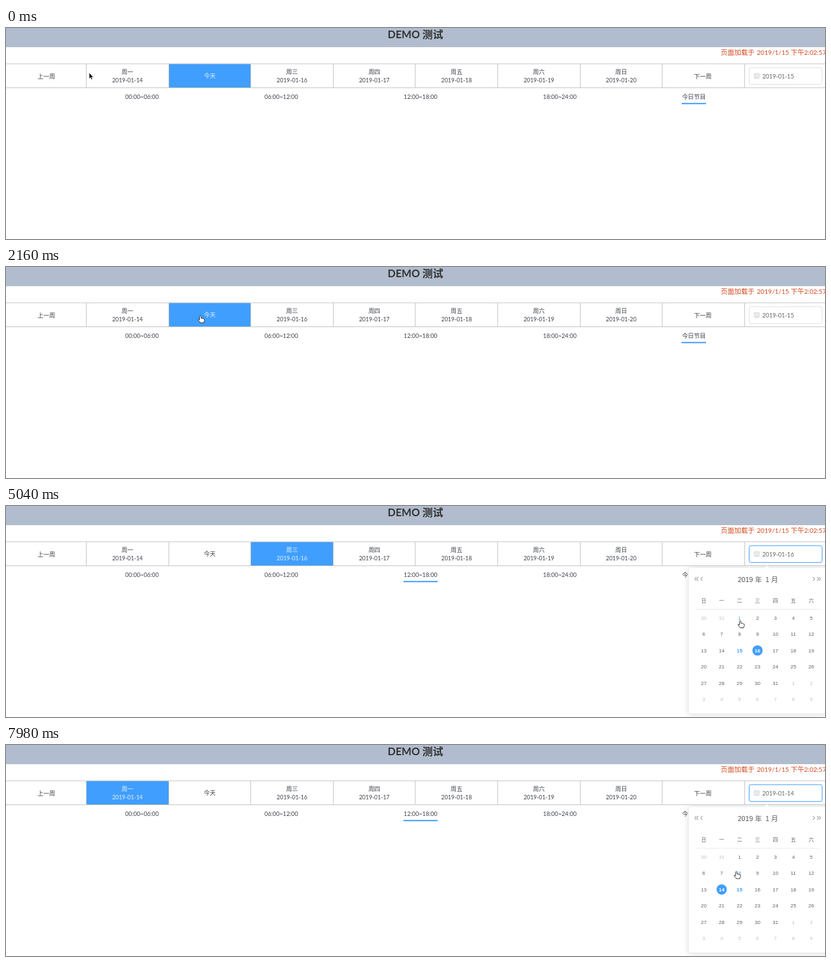
These frames come from a looping animation (1280x330 px, 8000 ms). An HTML page:

```html
<!DOCTYPE html>
<html lang="zh-CN">
<head>
<meta charset="utf-8">
<title>DEMO 测试</title>
<style>
html, body { margin: 0; width: 100%; height: 100%; overflow: hidden; background: #fff; }
svg { display: block; width: 1280px; height: 330px; }
text { font: 9.2px Lato, "Noto Sans CJK SC", "Noto Sans CJK", sans-serif; fill: #3c414b; text-anchor: middle; white-space: pre; }
text.left { text-anchor: start; }
.title { font-size: 16.3px; font-weight: 700; fill: #333; }
.loaded text { font-size: 10.6px; fill: #d2491c; }
.loaded .num { font-size: 10.1px; }
.cell rect { fill: none; }
.cell.hover rect { fill: #dfeed7; }
.cell.active rect { fill: #409eff; }
.cell.active text { fill: #e9f4ff; }
.cell .date { font-size: 8.9px; }
.line { stroke: #c6c6c6; fill: none; }
.popup text { font: 8px "Liberation Sans", "Noto Sans CJK SC", "Noto Sans CJK", sans-serif; fill: #606266; }
.popup .month { font-size: 10.6px; fill: #55575c; }
.popup .other { fill: #c0c4cc; }
.popup .today { fill: #409eff; font-weight: 700; }
.popup .over { fill: #409eff; }
.popup .picked { fill: #fff; font-weight: 700; }
.panel { filter: drop-shadow(0 1.3px 4px rgba(0, 0, 0, .13)); }
.icon { fill: none; stroke: #606266; stroke-width: .8; }
</style>
</head>
<body>
<svg id="stage" viewBox="0 0 1280 330"></svg>
<script>
const LOOP = 8000, STEP = 60;
const stage = document.getElementById('stage');
const label = (x, y, str, cls = '') => `<text x="${x}" y="${y}" class="${cls}">${str}</text>`;

// Week row
const edge = i => i === 0 ? 0 : 125.5 + (i - 1) * 128.6;
const dayNames = ['一', '二', '三', '四', '五', '六', '日'];
function weekCell(i) {
  const left = edge(i), mid = i === 0 ? 63 : left + 64.3;
  let body;
  if (i === 0) body = label(mid, 78.6, '上一周');
  else if (i === 8) body = label(mid - 1, 78.6, '下一周');
  else if (i === 2) body = label(mid, 77.8, '今天');
  else body = label(mid, 71.8, '周' + dayNames[i - 1]) + label(mid, 84.6, '2019-01-' + (13 + i), 'date');
  return `<g class="cell"><rect x="${left}" y="56" width="${edge(i + 1) - left}" height="37.5"/>${body}</g>`;
}
const range = n => [...Array(n).keys()];
const rules = range(9).map(i => `M${Math.floor(edge(i + 1)) + .5} 56V93.5`).join('');

// Time tabs
const tabs = ['00:00~06:00', '06:00~12:00', '12:00~18:00', '18:00~24:00', '今日节目'];
const tabX = i => i === 4 ? 1075 : 212.5 + i * 217.7;
const tabHalf = i => i === 4 ? 19 : 26.7;

// Calendar
const colX = c => 1090.5 + c * 28, rowY = r => 175 + r * 25.5;
const dayOf = n => n < 2 ? 30 + n : n > 32 ? n - 32 : n - 1;
const days = range(42).map(n =>
  label(colX(n % 7), rowY(Math.floor(n / 7)) + 2.9, dayOf(n), n < 2 || n > 32 ? 'day other' : n === 16 ? 'day today' : 'day'));
const heads = [...'日一二三四五六'].map((d, c) => label(colX(c), 151, d));

stage.innerHTML = `
  <rect width="1280" height="30" fill="#b1bdce"/>
  ${label(640, 15.8, 'DEMO 测试', 'title')}
  <g class="loaded">
    ${label(1117, 41.8, '页面加载于', 'left')}${label(1173.5, 41.8, '2019/1/15', 'left num')}
    ${label(1226.5, 41.8, '下午', 'left')}${label(1247.5, 41.8, '2:02:57', 'left num')}
  </g>
  ${range(9).map(weekCell).join('')}
  <path class="line" d="M0 56H1280M0 93.5H1280${rules}"/>
  <rect id="field" x="1161.5" y="62" width="114" height="26.3" rx="2.6" fill="#fff"/>
  <path d="M1169.5 71.7h7.6v7h-7.6zM1169.5 74h7.6M1171.5 70.7v2M1175 70.7v2M1171 76h4.6M1171 77.4h4.6" fill="none" stroke="#c0c4cc" stroke-width=".7"/>
  <text id="value" class="left" x="1182" y="78.5" style="fill:#606266"></text>
  ${tabs.map((s, i) => label(tabX(i), 110.6, s)).join('')}
  <rect id="bar" y="117.2" height="2" fill="#409eff"/>
  <g id="popup" class="popup">
    <g class="panel">
      <rect x="1066.5" y="96.5" width="215" height="228.5" rx="2.6" fill="#fff" stroke="#e4e7ed" stroke-width=".8"/>
      <path d="M1185 97L1189.2 92.8L1193.4 97Z" fill="#fff"/>
    </g>
    ${label(1155.5, 118.6, '2019', 'month')}${label(1176, 118.6, '年', 'month')}
    ${label(1190, 118.6, '1', 'month')}${label(1201.3, 118.6, '月', 'month')}
    <path class="icon" d="M1079 111l-2.6 3 2.6 3M1082 111l-2.6 3 2.6 3M1088.5 111l-2.6 3 2.6 3M1261.2 111l2.6 3-2.6 3M1267.6 111l2.6 3-2.6 3M1270.6 111l2.6 3-2.6 3"/>
    ${heads.join('')}
    <path d="M1077 161.5H1273" stroke="#ebeef5"/>
    <circle id="dot" r="8" fill="#409eff"/>
    ${days.join('')}
  </g>
  <g id="cursor">
    <path d="M0 0V9.4L2.1 7.5 3.6 10.8 5.1 10.1 3.7 6.9H6.5Z" fill="#000" stroke="#fff" stroke-width=".6"/>
    <path d="M-1.2 6.5V1.2a1.2 1.2 0 0 1 2.4 0V4q1.5-.6 2 .3 1.3-.4 1.7.5 1.5-.2 1.5 1.4V7.5q0 1.2-1 2.2V11H0q-.8-1.6-2-2.6l-1.6-2q.3-1.2 1.2-.7z" fill="#fff" stroke="#222" stroke-width=".9" stroke-linejoin="round"/>
    <path d="M-2.2-5Q0-5 0-3.6 0-5 2.2-5M0-3.6V3.6M-2.2 5Q0 5 0 3.6 0 5 2.2 5M-1.3 1.6H1.3" fill="none" stroke="#222" stroke-width=".9"/>
  </g>`;

const $ = id => document.getElementById(id);
const cells = [...stage.querySelectorAll('.cell')];
const dayEls = [...stage.querySelectorAll('.day')];
const pointers = [...$('cursor').children];

// Pointer route: time, x, y
const route = [
  [60, 130, 70], [540, 194, 77], [960, 194, 77], [1380, 276, 72], [1560, 288, 76],
  [2100, 288, 76], [2400, 440, 78], [2580, 446, 79], [2880, 572, 92], [3060, 598, 102],
  [3300, 632, 106], [3780, 632, 106], [3900, 632, 84], [4320, 1197.5, 73], [4600, 1197.5, 73],
  [5040, 1147.5, 179.5], [5400, 1149, 190], [5820, 1118, 223], [6060, 1118, 223],
  [6300, 1121, 224], [6780, 1121, 224], [7320, 1200, 75], [7560, 1200, 75], [7980, 1141.5, 198]
];
function pointerAt(t) {
  const k = route.findIndex(p => p[0] > t);
  if (k === 0) return route[0].slice(1);
  if (k < 0) return route[route.length - 1].slice(1);
  const [t0, x0, y0] = route[k - 1], [t1, x1, y1] = route[k];
  const p = (t - t0) / (t1 - t0), e = p * p * (3 - 2 * p);
  return [x0 + (x1 - x0) * e, y0 + (y1 - y0) * e];
}

const picks = [[0, 15], [780, 14], [1680, 15], [2520, 16], [6660, 14]];
const latest = (list, t) => list.filter(p => p[0] <= t).pop()[1];
const ease = (t, start) => 1 - (1 - Math.min(1, Math.max(0, (t - start) / 300))) ** 5;
const openness = t => t < 6660 ? ease(t, 4455) : t < 7400 ? 1 - ease(t, 6660) : ease(t, 7400);

function draw(t) {
  const [x, y] = pointerAt(t), date = latest(picks, t), open = openness(t);
  const live = t >= 780;
  const overCell = live && y >= 56 && y < 93.5 ? range(9).find(i => x >= edge(i) && x < edge(i + 1)) : -1;
  const overField = x > 1161 && x < 1276 && y > 62 && y < 89;
  const overTab = live && y > 97 && y < 120 && tabs.some((s, i) => Math.abs(x - tabX(i)) < tabHalf(i));
  const col = Math.round((x - colX(0)) / 28), row = Math.round((y - rowY(0)) / 25.5);
  const inPanel = open > .5 && x > 1077 && y > 162;
  const overDay = inPanel ? row * 7 + col : -1;

  cells.forEach((c, i) => {
    c.classList.toggle('active', i === date - 13);
    c.classList.toggle('hover', i === overCell);
  });
  dayEls.forEach((d, n) => {
    d.classList.toggle('over', n === overDay);
    d.classList.toggle('picked', n === date + 1);
  });
  $('dot').setAttribute('cx', colX((date + 1) % 7));
  $('dot').setAttribute('cy', rowY(2));

  const focused = t >= 4440 && t < 6540 || t >= 7400;
  $('field').setAttribute('stroke', focused ? '#409eff' : overField || t >= 6540 ? '#c0c4cc' : '#dcdfe6');
  $('value').textContent = '2019-01-' + date;

  const tab = t < 3420 ? 4 : 2;
  $('bar').setAttribute('x', tabX(tab) - tabHalf(tab));
  $('bar').setAttribute('width', tabHalf(tab) * 2);

  $('popup').setAttribute('transform', `translate(0 ${96 * (1 - open)}) scale(1 ${open})`);
  $('popup').style.opacity = open;
  $('popup').style.display = open > .001 ? '' : 'none';

  const kind = overField ? 2 : overCell >= 0 || overTab || inPanel ? 1 : 0;
  pointers.forEach((p, i) => p.style.display = i === kind ? '' : 'none');
  $('cursor').setAttribute('transform', `translate(${x} ${y})`);
}

const begin = performance.now();
function tick() {
  const t = (performance.now() - begin) % LOOP;
  draw(Math.floor(t / STEP) * STEP);
  requestAnimationFrame(tick);
}
draw(0);
requestAnimationFrame(tick);
</script>
</body>
</html>
```
